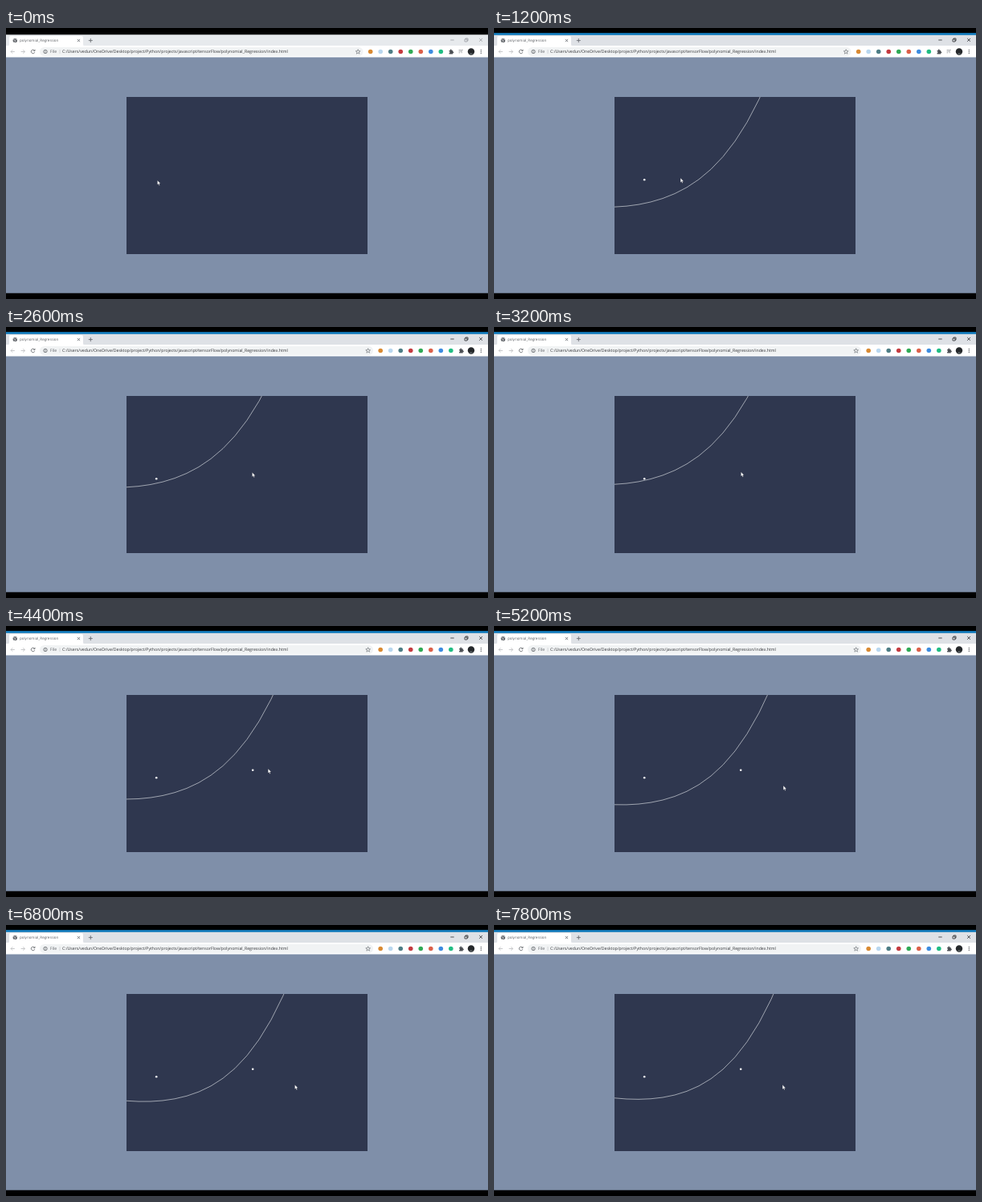
Recreate the animation shown at these times as an HTML page. Size 600 by 338 pixels, loop 8000 ms.

```html
<!DOCTYPE html>
<html lang="en">
<head>
<meta charset="utf-8">
<title>polynomial_Regression</title>
<style>
  html, body { margin: 0; height: 100%; overflow: hidden; background: #000; }
  svg { display: block; width: 600px; height: 338px; }
  text { font-family: "Open Sans", "Noto Sans", sans-serif; text-rendering: geometricPrecision; }
  .line { fill: none; stroke: #5f6368; stroke-width: .8; }
</style>
</head>
<body>
<svg viewBox="0 0 600 338">
  <clipPath id="board"><rect x="150" y="86" width="300" height="196"/></clipPath>

  <!-- tab strip -->
  <rect id="strip" y="8.3" width="600" height="15" fill="#dee1e6"/>
  <rect id="accent" y="6.2" width="600" height="2.6" fill="#1580c4"/>
  <path d="M1 23Q4 23 4 20V12Q4 10 6 10H94Q96 10 96 12V20Q96 23 99 23Z" fill="#fff"/>
  <circle cx="11.3" cy="15.6" r="2.7" fill="#5f6368"/>
  <path d="M9.4 14.6l1.8.6.3 1.6-.8 1M11.8 13.6l1 1 .8.2" fill="none" stroke="#fff" stroke-width=".7"/>
  <text x="17" y="17.2" font-size="4.5" fill="#5a5d61">polynomial_Regression</text>
  <path class="line" d="M88.9 14l3.2 3.2m0-3.2l-3.2 3.2M102.8 15.6h5m-2.5-2.5v5"/>
  <g id="buttons" class="line">
    <path d="M553.3 15h4.4M589.2 13l3.8 3.8m0-3.8l-3.8 3.8"/>
    <path d="M571 14h3v3h-3zM572 14v-1h3v3h-1"/>
  </g>

  <!-- toolbar -->
  <rect y="22" width="600" height="15" fill="#fff"/>
  <rect id="address" x="42" y="24" height="11" rx="5.5" fill="#f1f3f4"/>
  <path class="line" d="M10.8 29.5H6m2.2-2.2L6 29.5l2.2 2.2M18.6 29.5h4.8m-2.2-2.2l2.2 2.2-2.2 2.2" style="stroke:#babcbe"/>
  <path class="line" d="M35.4 28a2.3 2.3 0 1 0 .4 2.2M36 26.8v1.8h-1.8"/>
  <circle class="line" cx="49" cy="29.5" r="2.2"/>
  <path class="line" d="M49 29.2v1.5M49 28v.6"/>
  <g font-size="5.18">
    <text x="55" y="31.3" fill="#5f6368">File</text>
    <text x="70" y="31.3" fill="#303236">C:/Users/vedun/OneDrive/Desktop/project/Python/projects/javascript/tensorFlow/polynomial_Regression/index.html</text>
  </g>
  <path d="M67 27v5" stroke="#c4c7ca" stroke-width=".6"/>
  <g id="tools">
    <path class="line" style="stroke-width:.6" d="M438.2 26.7l.8 2 2.1.1-1.7 1.3.6 2.1-1.8-1.2-1.8 1.2.6-2.1-1.7-1.3 2.1-.1z"/>
    <g id="icons"></g>
    <path d="M551.6 28h1.3q-.2-1.4.9-1.4t.9 1.4h1.5v1.5q1.2 0 1.2.9t-1.2.9v1.3h-4.6v-1.6q1 0 1-.9t-1-.9z" fill="#4b4f54"/>
  </g>
  <path id="media" class="line" style="stroke:#9a9da1" d="M563.6 27.5h3m-3 1.7h3m-3 1.7h1.6M567.2 31.3v-4h1.7"/>
  <circle cx="579" cy="29.5" r="4.2" fill="#25282b"/>
  <path d="M576.3 32.7q2.5-3.4 5.4 0-2.7 1.8-5.4 0" fill="#51575b"/>
  <path d="M591.3 27.5v.01m0 2v.01m0 2v.01" stroke="#5f6368" stroke-width="1.3" stroke-linecap="round"/>

  <!-- page -->
  <rect y="36.5" width="600" height="294.2" fill="#7f8fa9"/>
  <rect x="150" y="86" width="300" height="196" fill="#2f374f"/>
  <g clip-path="url(#board)">
    <polyline id="curve" fill="none" stroke="#d0d4da" stroke-width=".7"/>
  </g>
  <g id="dots"></g>
  <path id="cursor" d="M0 0V5.6L1.3 4.5 2.2 6.4 3.1 6 2.3 4.1H4Z" fill="#fff" stroke="#1c2130" stroke-width=".3"/>
</svg>
<script>
const $ = id => document.getElementById(id);
const LOOP = 8000, STEP = 200;

// Board coordinates run from 0 to 1 with y upwards
const toX = x => 150 + 300 * x, toY = y => 282 - 196 * y;
const points = [{ x: .124, y: .473, from: 1000 }, { x: .524, y: .5214, from: 3850 }];
const startCoeffs = [.274, .047, 1.01, 0, 2.25];
const path = [
  { t: 900, x: 188.4, y: 190 }, { t: 1700, x: 305, y: 182.2 }, { t: 3800, x: 308.3, y: 180.2 },
  { t: 4400, x: 326.2, y: 178 }, { t: 5000, x: 360.2, y: 199 }, { t: LOOP, x: 359, y: 199.4 }
];

const evaluate = (coeffs, x) => coeffs.reduceRight((sum, c) => sum * x + c, 0);

// Polynomial after gradient descent on the squared error of the points placed so far
function train(until) {
  const dt = 10;
  let coeffs = startCoeffs;
  for (let t = points[0].from; t < until; t += dt) {
    const placed = points.filter(p => t >= p.from);
    const rate = dt * (t < 2000 ? .0008 : .0016) / placed.length;
    const errors = placed.map(p => p.y - evaluate(coeffs, p.x));
    coeffs = coeffs.map((c, n) =>
      placed.reduce((sum, p, i) => sum + rate * errors[i] * p.x ** n, c));
  }
  return coeffs;
}

function curvePoints(coeffs) {
  return Array.from({ length: 21 }, (_, i) => [toX(i / 20), toY(evaluate(coeffs, i / 20))]).join(" ");
}

function cursorAt(t) {
  const i = path.findIndex(p => p.t > t);
  const b = path[i], a = path[i - 1] || b;
  const f = a === b ? 0 : (t - a.t) / (b.t - a.t);
  return [a.x + (b.x - a.x) * f, a.y + (b.y - a.y) * f];
}

const circle = (x, y, r, fill) => `<circle cx="${x}" cy="${y}" r="${r}" fill="${fill}"/>`;
const show = (id, on) => $(id).setAttribute("visibility", on ? "visible" : "hidden");

const iconColors = ["#d98a32", "#b9d7ef", "#4d7d85", "#c43a3f", "#2faa55", "#dc6049", "#3d8ce0", "#20bd83"];
$("icons").innerHTML = iconColors.map((color, i) => circle(453.7 + 12.52 * i, 29.5, 2.8, color)).join("");

function draw(now) {
  const t = Math.floor(now % LOOP / STEP) * STEP;
  const active = t >= 600, shifted = t >= 2000;
  $("strip").setAttribute("fill", active ? "#dee1e6" : "#e7eaed");
  $("buttons").style.stroke = active ? "#2c2e31" : "#9b9ea2";
  show("accent", active);
  show("media", !shifted);
  $("tools").setAttribute("transform", `translate(${shifted ? 12.5 : 0})`);
  $("address").setAttribute("width", shifted ? 415 : 402.5);

  show("curve", t >= points[0].from);
  $("curve").setAttribute("points", curvePoints(train(t)));
  $("dots").innerHTML = points.filter(p => t >= p.from)
    .map(p => circle(toX(p.x), toY(p.y), 1.3, "#f4f5f7")).join("");
  $("cursor").setAttribute("transform", `translate(${cursorAt(t)})`);
  requestAnimationFrame(draw);
}
requestAnimationFrame(draw);
</script>
</body>
</html>
```
